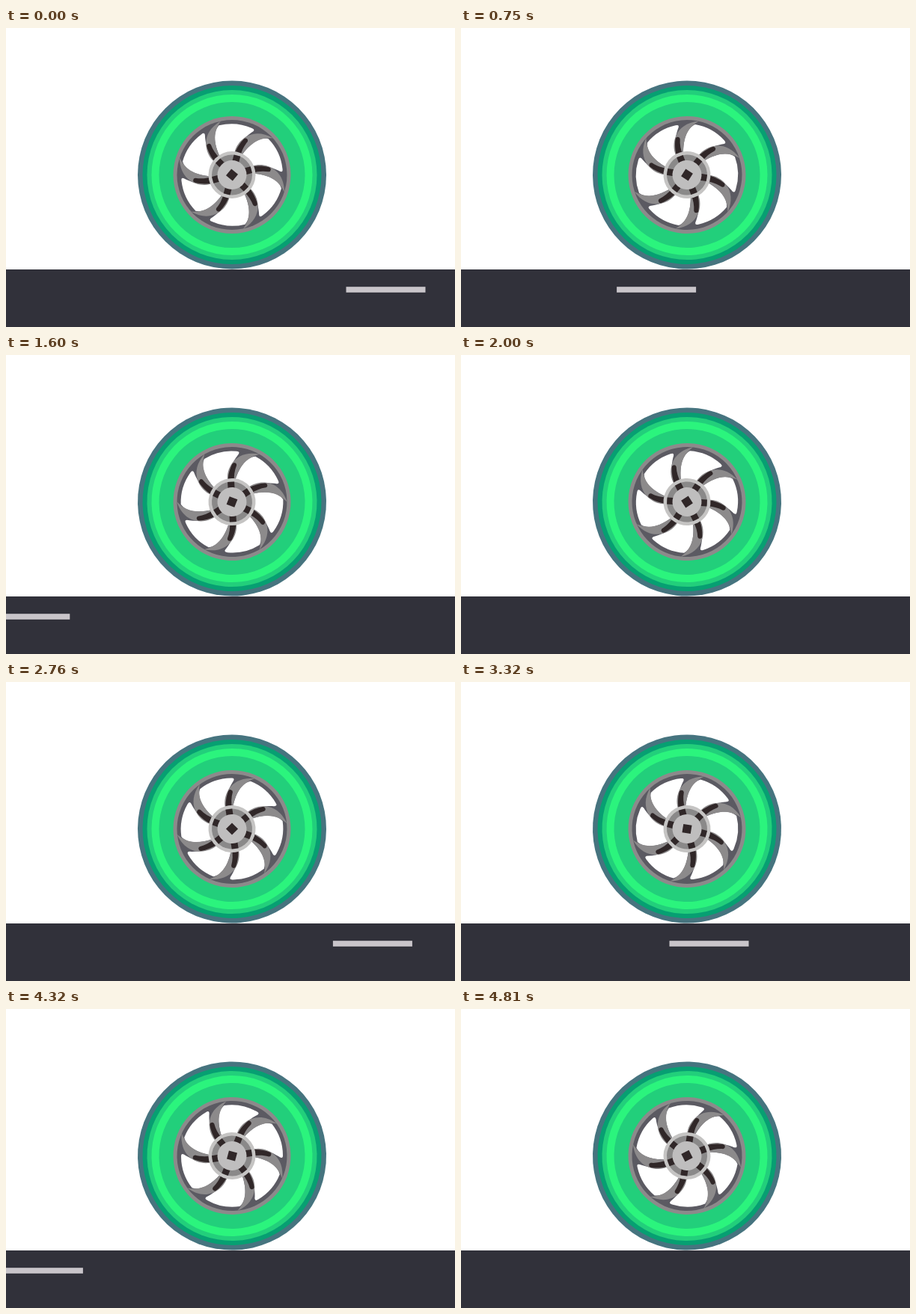
These frames come from a looping animation (600 px wide and 400 px high, 4910 ms). An HTML page with a canvas:

```html
<!DOCTYPE html>
<html lang="en">
<head>
<meta charset="utf-8">
<title>Rolling wheel</title>
<style>
  html, body { margin: 0; width: 100%; height: 100%; overflow: hidden; background: #fff; }
  canvas { display: block; }
</style>
</head>
<body>
<canvas id="stage" width="600" height="400"></canvas>
<script>
const ctx = document.getElementById('stage').getContext('2d');
const LOOP = 4910;
const WHEEL_STEP = 6;    // degrees per pose
const BAR_STEP = 17.6;   // pixels per pose
const BAR_LAP = 45 * BAR_STEP;

// Pace of the stepped motion: [time in ms, pose]
const PACE = [[0, 0], [750, 14], [850, 15], [2760, 46], [4810, 79], [LOOP, 80]];

// One sixth of the wheel, relative to its centre
const opening = new Path2D('M28 -2C51 0 63 8 66 18A68 68 0 0 1 40.9 54.3Q35.8 58.5 36 50.5C35 40 32 27 24.4 18.2Z');
const spoke = new Path2D('M28 -12C42 -17 70 -10 70 23C63 8 51 0 28 -2Z');
const inlay = new Path2D('M26 -11C34 -12.7 43 -12 49.5 -10.3A3.1 3.1 0 0 1 49 -4.2C42 -5.4 34 -5 27 -2.5Z');

function poseAt(time) {
  const i = PACE.findIndex(([end]) => end > time);
  const [t0, n0] = PACE[i - 1], [t1, n1] = PACE[i];
  return Math.floor(n0 + (n1 - n0) * (time - t0) / (t1 - t0) + 1e-6);
}

function disc(radius, color) {
  ctx.fillStyle = color;
  ctx.beginPath();
  ctx.arc(0, 0, radius, 0, 2 * Math.PI);
  ctx.fill();
}

function rect(color, x, y, w, h) {
  ctx.fillStyle = color;
  ctx.fillRect(x, y, w, h);
}

function shape(path, color) {
  ctx.fillStyle = color;
  ctx.fill(path);
}

function turned(degrees, draw) {
  ctx.save();
  ctx.rotate(degrees * Math.PI / 180);
  draw();
  ctx.restore();
}

function sixfold(draw) {
  for (let a = 0; a < 360; a += 60) turned(a, draw);
}

function drawWheel() {
  // Tyre
  disc(126, '#46747f');
  disc(119.5, '#079f72');
  disc(113.5, '#22cf7b');
  disc(107.5, '#2bf47d');
  disc(97.5, '#22cf7b');
  // Rim and spokes
  disc(78.5, '#8c8a8b');
  disc(73.5, '#5b5a62');
  sixfold(() => shape(opening, '#fff'));
  sixfold(() => {
    shape(spoke, '#8c8a8b');
    shape(inlay, '#302728');
  });
  // Hub
  disc(31.5, '#c5c4c3');
  disc(27, '#8a8989');
  sixfold(() => turned(-15, () => rect('#302728', 18, -4.5, 8.7, 9)));
  disc(19.5, '#bfbebe');
  turned(39, () => rect('#302728', -5.7, -5.7, 11.4, 11.4));
}

function render(time) {
  const pose = poseAt(time);
  rect('#fff', 0, 0, 600, 400);
  rect('#31313a', 0, 323, 600, 77);
  const barX = 454.5 - BAR_STEP * pose;
  for (const lap of [0, 1]) rect('#c9c5ca', barX + BAR_LAP * lap, 346.2, 106, 7.6);

  ctx.save();
  ctx.translate(302, 196.5);
  turned(WHEEL_STEP * pose, drawWheel);
  ctx.restore();
}

function tick() {
  render(performance.now() % LOOP);
  requestAnimationFrame(tick);
}
tick();
</script>
</body>
</html>
```
